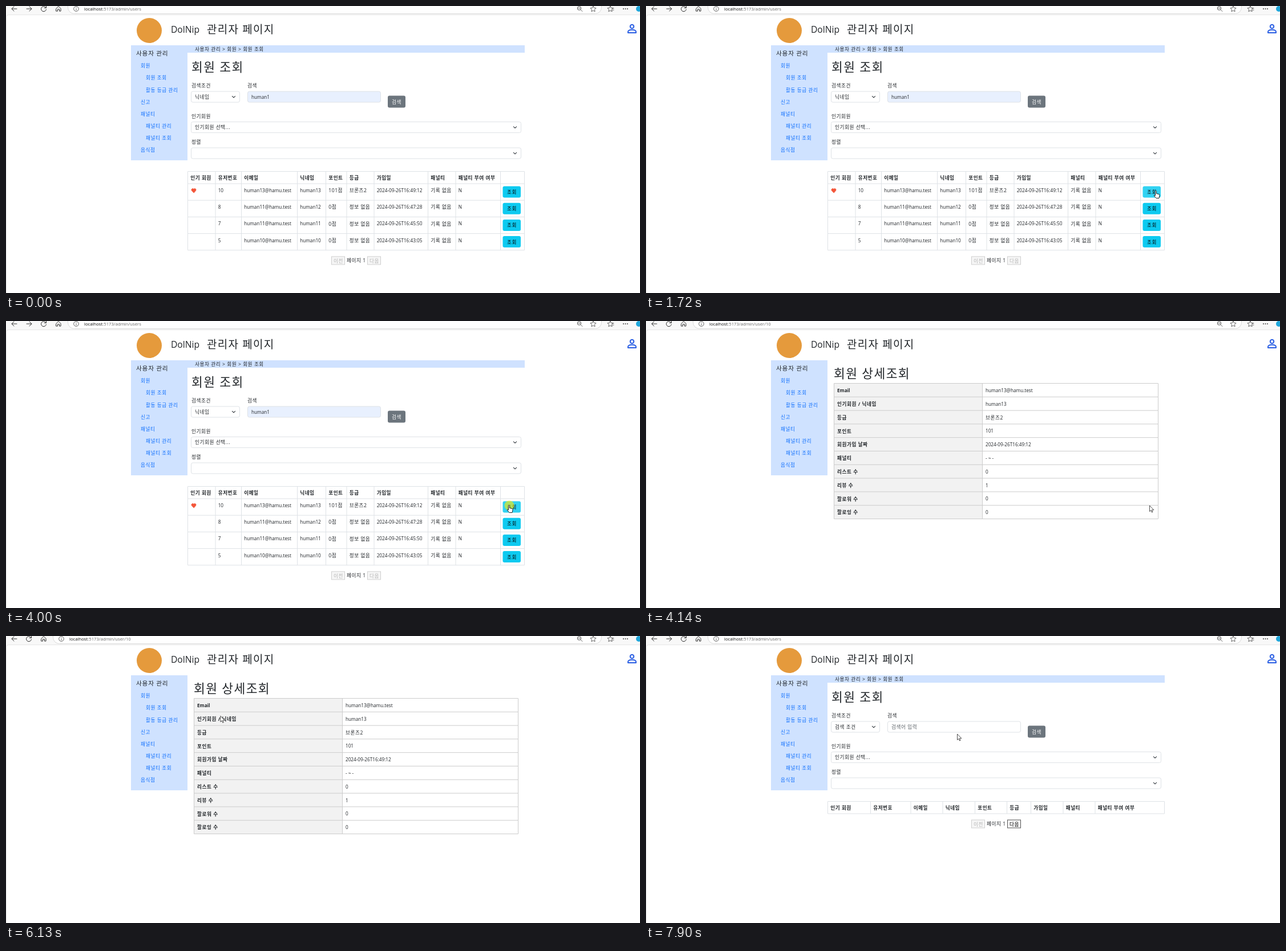
Recreate the animation shown at these times as an HTML page. Size 1111 by 504 pixels, loop 8000 ms.

```html
<!DOCTYPE html>
<html lang="ko">
<head>
<meta charset="utf-8">
<title>관리자 페이지</title>
<style>
html, body { margin: 0; width: 100%; height: 100%; overflow: hidden; background: #fff; }
svg { display: block; width: 1111px; height: 504px; }
text { font-family: "Open Sans", "Noto Sans CJK KR", sans-serif; white-space: pre; }
</style>
</head>
<body>
<svg id="stage" viewBox="0 0 1111 504"></svg>
<script>
const INK = '#212529', LINE = '#dee2e6', BLUE = '#cfe2ff', LINK = '#0d6efd';
const LOOP = 8000, DETAIL_AT = 4070, BACK_AT = 7280, STEP = 70;
const KOREAN = 8.6, LATIN = 8.2;

// Text is placed by its left edge and vertical centre.
function text(x, cy, str, { size, fill = INK, weight = 400 } = {}) {
  const korean = /[가-힣]/.test(str);
  size ??= korean ? KOREAN : LATIN;
  return `<text x="${x}" y="${cy + size * .37}" font-size="${size}" fill="${fill}" font-weight="${weight}"` +
    ` letter-spacing="${korean ? size * .065 : 0}">${str.replace(/>/g, '&gt;')}</text>`;
}
const rect = (x, y, w, h, fill, stroke = 'none', r = 0, extra = '') =>
  `<rect x="${x}" y="${y}" width="${w}" height="${h}" rx="${r}" fill="${fill}" stroke="${stroke}" ${extra}/>`;
const path = (d, stroke, width = 1, fill = 'none') =>
  `<path d="${d}" fill="${fill}" stroke="${stroke}" stroke-width="${width}" stroke-linecap="round" stroke-linejoin="round"/>`;
const circle = (x, y, r, fill, stroke = 'none') =>
  `<circle cx="${x}" cy="${y}" r="${r}" fill="${fill}" stroke="${stroke}"/>`;
const group = (id, content) => `<g id="${id}">${content}</g>`;
const bold = { weight: 700 };

const chevron = (x, y) => path(`M${x - 2.6} ${y - 1.2}l2.6 2.6 2.6-2.6`, '#343a40', 1.1);
const field = (x, y, w, fill = '#fff') => rect(x + .5, y + .5, w - 1, 19, fill, LINE, 3);
const select = (x, y, w, label) =>
  field(x, y, w) + text(x + 7, y + 10, label) + chevron(x + w - 11, y + 10);

function grid(xs, ys, color) {
  const [left, right, top, bottom] = [xs[0], xs.at(-1), ys[0], ys.at(-1)];
  const d = xs.map(x => `M${x} ${top}V${bottom}`).join('') + ys.map(y => `M${left} ${y}H${right}`).join('');
  return `<path d="${d}" fill="none" stroke="${color}"/>`;
}

function toolbar(shift, address) {
  const [reload, home, info] = [66, 92, 123].map(x => x - shift);
  const pill = 108.5 - shift;
  return rect(pill, -12, 1043.5 - pill, 25.5, '#fff', '#d9d9d9', 11) +
    (shift ? '' : path('M36 5H45M41 1l4 4-4 4', '#333')) +
    path(`M${reload + 4} 3a4.5 4.5 0 1 0 .5 3M${reload + 4.5} 0v3.3h-3.3`, '#333') +
    path(`M${home - 4} 4.5l4-4 4 4V9h-2.5V5.8h-3V9H${home - 4}z`, '#333') +
    circle(info, 5, 4.3, 'none', '#666') + path(`M${info} 4.6v2.6M${info} 2.6v.1`, '#666') +
    `<text x="${info + 14}" y="7.8" font-size="7.7" fill="#666"><tspan fill="#111">localhost</tspan>${address}</text>`;
}

const star = (x, y) =>
  path(`M${x} ${y - 5}l1.5 3.2 3.5.5-2.5 2.5.6 3.5-3.1-1.7-3.1 1.7.6-3.5-2.5-2.5 3.5-.5z`, '#555', .9);

function frame() {
  const links = [[0, 105, '회원'], [9, 126, '회원 조회'], [9, 147.5, '활동 등급 관리'], [0, 168.5, '신고'],
    [0, 189.5, '패널티'], [9, 211, '패널티 관리'], [9, 232, '패널티 조회'], [0, 253, '음식점']];
  return circle(251, 43, 22, '#e59a3c') +
    text(289, 41.5, 'DolNip', { size: 15.6 }) + text(352, 41, '관리자 페이지', { size: 19 }) +
    circle(1097, 36, 3.2, 'none', '#2b5fe3" stroke-width="2') +
    path('M1090 47v-1.5c0-5 14-5 14 0V47z', '#2b5fe3', 2) +
    rect(219, 69, 99, 202, BLUE) + text(228, 83.5, '사용자 관리', { size: 10.75 }) +
    links.map(([dx, y, label]) => text(236 + dx, y, label, { fill: LINK })).join('');
}

function browser() {
  return rect(0, 0, 1111, 504, '#f8f8f8') + rect(.5, 15.5, 1130, 510, '#fff', '#e6e6e6', 4) +
    rect(4, -6, 22, 19, '#e5e5e5', 'none', 3, 'id="backHover"') +
    path('M10 5H19M14 1l-4 4 4 4', '#333') +
    group('listBar', toolbar(0, ':5173/admin/users')) + group('detailBar', toolbar(26, ':5173/admin/user/10')) +
    circle(1004.5, 4, 3.2, 'none', '#555') + path('M1007 6.5l3 3M1003 4h3', '#555', .9) +
    star(1029, 5) + star(1059, 5) + path('M1062 4h3M1063 7h2', '#555', .9) +
    [1082, 1085.5, 1089].map(x => circle(x, 5, .9, '#333')).join('') + circle(1109, 5, 5, '#1fa7dc');
}

const HEADERS = ['인기 회원', '유저번호', '이메일', '닉네임', '포인트', '등급', '가입일', '패널티', '패널티 부여 여부'];
const header = xs => HEADERS.map((label, i) => text(xs[i] + 4.7, 301.5, label, bold)).join('');

function pager(y, nextColor, nextBorder) {
  const button = (x, label, fill, border) =>
    rect(x + .5, y - 7, 23, 14, '#f6f6f6', border) + text(x + 4, y + .5, label, { fill });
  return button(570, '이전', '#b5b5b5', '#cfcfcf') + text(597, y - .5, '페이지 1') +
    button(633, '다음', nextColor, nextBorder);
}

function searchForm() {
  return rect(318, 69, 591, 13, BLUE) + text(331, 76, '사용자 관리 > 회원 > 회원 조회') +
    text(325, 107, '회원 조회', { size: 21.5 }) +
    text(325, 139.5, '검색조건') + text(423, 139.5, '검색') +
    rect(669, 157.5, 31, 21, '#6c757d', 'none', 3) + text(676, 168.5, '검색', { fill: '#fff' }) +
    text(325, 193.5, '인기회원') + select(324, 203, 579, '인기회원 선택...') +
    text(325, 239, '정렬') + select(324, 248.5, 579, '');
}

const rowY = i => 312 + 29.2 * i;
const buttonBox = i => ({ x: 870.5, y: rowY(i) + 4.5, w: 31.5, h: 20 });

function results() {
  const xs = [318.5, 367, 412.5, 510.5, 560.5, 597, 645, 739.5, 788, 866.5, 908.5];
  const users = [
    [10, 13, 13, '101점', '브론즈2', '49:12'],
    [8, 11, 12, '0점', '정보 없음', '47:28'],
    [7, 11, 11, '0점', '정보 없음', '45:50'],
    [5, 10, 10, '0점', '정보 없음', '43:05']];
  const rows = users.map(([id, mail, nick, points, grade, time], i) => {
    const cells = [`${id}`, `human${mail}@hamu.test`, `human${nick}`, points, grade,
      `2024-09-26T16:${time}`, '기록 없음', 'N'];
    const b = buttonBox(i);
    return cells.map((cell, c) => text(xs[c + 1] + 4.7, rowY(i) + 12, cell)).join('') +
      rect(b.x, b.y, b.w, b.h, '#0dcaf0', 'none', 3, 'class="view"') + text(878, b.y + 10.3, '조회', { fill: '#000' });
  });
  return select(324, 149.5, 86, '닉네임') + field(423, 149.5, 234, '#e8f0fe') + text(430, 160, 'human1') +
    grid(xs, [290.5, ...[0, 1, 2, 3, 4].map(rowY)], LINE) + header(xs) + rows.join('') +
    path('M329 328l-3.6-3.8a2.2 2.2 0 0 1 3.6-2.6 2.2 2.2 0 0 1 3.6 2.6z', '#f4563a', .8, '#f4563a') +
    pager(447, '#b5b5b5', '#cfcfcf');
}

function emptyResults() {
  const xs = [318.5, 393.5, 464, 520, 576.5, 632.5, 674.5, 731, 787, 908.5];
  return select(324, 149.5, 86, '검색 조건') + field(423, 149.5, 234) +
    text(430, 160, '검색어 입력', { fill: '#5a6167' }) +
    grid(xs, [290.5, 312], LINE) + header(xs) + pager(330, '#000', '#555');
}

function detail() {
  const rows = [['Email', 'human13@hamu.test'], ['인기회원 / 닉네임', 'human13'], ['등급', '브론즈2'], ['포인트', '101'],
    ['회원가입 날짜', '2024-09-26T16:49:12'], ['패널티', '- ~ -'], ['리스트 수', '0'], ['리뷰 수', '1'],
    ['팔로워 수', '0'], ['팔로잉 수', '0']];
  const top = i => 109.5 + 23.8 * i;
  return text(329, 92, '회원 상세조회', { size: 21.5 }) + rect(329, 109.5, 261, 238, '#f2f2f2') +
    grid([329.5, 589.5, 897.5], [...rows.keys(), rows.length].map(top), '#ccc') +
    rows.map(([label, value], i) =>
      text(335, top(i) + 12.5, label, bold) + text(595, top(i) + 12.5, value)).join('');
}

document.getElementById('stage').innerHTML = browser() + frame() +
  group('form', searchForm()) + group('results', results()) + group('empty', emptyResults()) +
  group('detail', detail()) +
  group('pointer', `<circle id="press" r="8.5" fill="#ffe900" fill-opacity=".6"/>` +
    group('arrow', path('M.5.5V10.5L2.8 8.4 4.4 12 6 11.3 4.4 7.8H7.5z', '#222', .8, '#fff')) +
    group('hand', path('M-1.5 6.5V.5a1 1 0 0 1 2 0V4.5l4.5 1q1.3.4 1 2L5 12.5H0L-3.8 8q0-1.8 2.3-.3z', '#111', .9, '#fff')));

// Pointer keys: time, x, y of the tip.
const keys = [
  [320, 1052, 504], [600, 1030, 400], [900, 743, 293], [1160, 806, 352],
  [1220, 812, 362], [1460, 850, 314], [1720, 894, 325],
  [2380, 894, 325], [2790, 707, 184], [3220, 884, 341],
  [3230, 884, 341], [3500, 852, 330], [3860, 882, 324],
  [4400, 882, 324], [4540, 876, 341], [4900, 690, 252], [5160, 573, 299],
  [5220, 573, 299], [5500, 648, 321], [6060, 398, 148], [6061, 398, 148],
  [6540, 7, 15], [6610, 7, -30], [6870, 7, -30], [6940, 6, -5],
  [7000, 7, -2], [7420, 7, -2], [7900, 545, 172], [LOOP, 545, 172]];

function pointerAt(t) {
  if (t < keys[0][0]) return [1052, 520];
  const i = keys.findIndex(key => key[0] > t);
  const [t0, x0, y0] = keys[i - 1], [t1, x1, y1] = keys[i];
  const u = Math.floor((t - t0) / STEP) * STEP / (t1 - t0);
  const e = u * u * (3 - 2 * u);
  return [x0 + (x1 - x0) * e, y0 + (y1 - y0) * e];
}

const el = id => document.getElementById(id);
const show = (id, on) => el(id).style.display = on ? '' : 'none';
const buttons = [...document.querySelectorAll('.view')];

function render(t) {
  const [x, y] = pointerAt(t);
  const onDetail = t >= DETAIL_AT && t < BACK_AT;
  const searched = t < DETAIL_AT;
  const hovered = searched ? buttons.findIndex((_, i) => {
    const b = buttonBox(i);
    return x >= b.x && x <= b.x + b.w && y >= b.y && y <= b.y + b.h;
  }) : -1;
  buttons.forEach((b, i) => b.setAttribute('fill', i === hovered ? '#31d2f2' : '#0dcaf0'));
  show('listBar', !onDetail);
  show('detailBar', onDetail);
  show('form', !onDetail);
  show('results', searched);
  show('empty', t >= BACK_AT);
  show('detail', onDetail);
  show('backHover', t >= 7140 && x < 26 && y < 13);
  show('press', (t >= 4000 && t < DETAIL_AT) || (t >= 7140 && t < BACK_AT));
  show('hand', hovered >= 0);
  show('arrow', hovered < 0);
  el('pointer').setAttribute('transform', `translate(${x} ${y})`);
}

function tick() {
  render(performance.now() % LOOP);
  requestAnimationFrame(tick);
}
tick();
</script>
</body>
</html>
```
